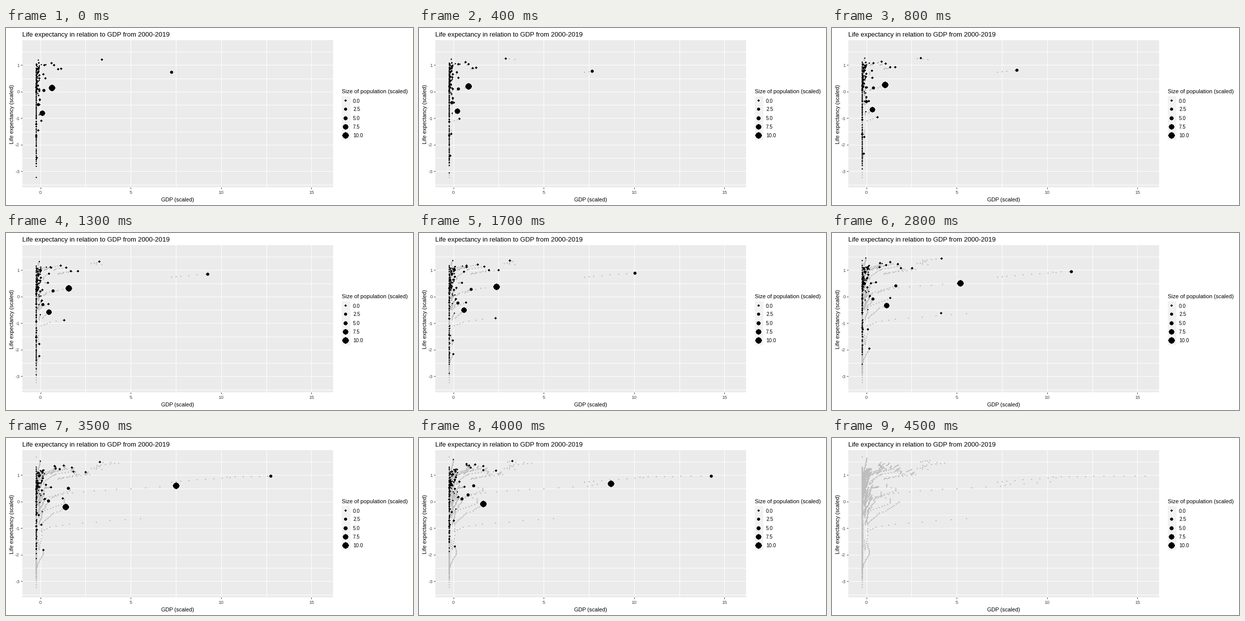
These frames come from a looping animation (800 by 350 pixels, 5000 ms). A matplotlib script:

```python
import numpy as np
import matplotlib.pyplot as plt
from matplotlib.animation import FuncAnimation
from matplotlib.collections import PathCollection
from matplotlib.patches import Rectangle
from matplotlib.path import Path
from matplotlib.transforms import IdentityTransform

W, H, DPI = 800, 350, 100
PX = 72 / DPI                      # one pixel in points
LEFT, RIGHT, TOP, BOTTOM = 32, 643, 24, 315
X0, XU, Y0, YU = 67.55, 35.52, 125.88, 52.5   # pixel origin and unit length
YEARS = np.arange(20)
FRAMES, MOVING = 100, 90

plt.rcParams.update({"font.family": "Liberation Sans", "axes.unicode_minus": False})


# ---- data: GDP in trillions, life expectancy in years, population in millions

def path(**points):
    """Straight pieces through a few key years, given as y<year>=value."""
    return np.interp(YEARS, [int(k[1:]) for k in points], list(points.values()))


WORLD = path(y0=0, y2=.03, y8=.62, y9=.52, y14=.86, y15=.72, y19=1)
EURO = path(y0=1.36, y2=1.5, y8=2.92, y10=2.65, y14=2.86, y15=2.44, y19=2.73)


def growing(start, end):
    return start + (end - start) * WORLD


def boom(start, peak, end):
    return path(y0=start, y3=.9 * start + .1 * peak, y11=peak, y14=peak, y16=end, y19=end)


def euro(first, last):
    return EURO * np.linspace(first, last, 20)


def ramp(*values):
    return np.interp(YEARS, np.linspace(0, 19, len(values)), values)


COUNTRIES = [
    (path(y0=10.25, y2=10.94, y8=14.71, y9=14.45, y14=17.53, y19=21.43), ramp(76.6, 78.5, 78.8), 282),
    (path(y0=1.21, y3=1.66, y6=2.75, y10=6.09, y14=10.48, y16=11.23, y19=14.28), ramp(71.1, 76.7), 1262),
    (path(y0=4.97, y2=4.18, y5=4.83, y7=4.58, y12=6.27, y15=4.44, y19=5.12), ramp(81, 83, 84.3), 127),
    (path(y0=.47, y9=1.34, y11=1.82, y19=2.83), ramp(62.1, 69.6), 1057),
    (path(y0=.4, y3=1.05, y6=2.5, y9=5.6, y11=7.92, y12=.2), ramp(59.4, 66.8), 47),
    (euro(1, 1), ramp(79.1, 82.6), 61),
    (euro(1.4, 1.38), ramp(77.9, 81), 82),
    (euro(1.22, .98), ramp(77.7, 81.3), 59),
    (euro(.85, .75), ramp(79.8, 83.3), 57),
    (euro(.47, .52), ramp(79, 83.5), 41),
    (boom(.26, 2.15, 1.45), ramp(65.2, 68.5, 73), 146),
    (boom(.6, 2.55, 1.85), ramp(70.1, 75.9), 175),
    (boom(.74, 1.82, 1.62), ramp(79.2, 82), 31),
    (boom(.4, 1.5, 1.36), ramp(79.2, 82.9), 19),
    (boom(.15, .42, .36), ramp(56, 52.6, 56, 61.6, 64), 46),
    (boom(.07, .56, .45), ramp(46.3, 54.7), 122),
    (growing(.7, 1.25), ramp(74.5, 75), 99),
    (growing(.57, 1.68), ramp(75.9, 83.2), 47),
    (growing(.17, 1.12), ramp(65.2, 71.4), 212),
    (growing(.26, .85), ramp(69.9, 77.6), 64),
    (growing(.17, .36), ramp(80.9, 85.1), 7),
    (growing(.002, .004), ramp(39.4, 48, 54.7), 4.5),
    (growing(.001, .002), ramp(47.8, 41.8, 43.5, 49.5, 54), 2),
    (growing(.001, .002), path(y0=79.5, y11=81.5, y12=85.6, y13=82), 1),
]


def middle_countries(count=22):
    rng = np.random.default_rng(5)
    for k in range(count):
        start = 62 + 18 * (k / count) ** .6 + rng.normal(0, .5)
        gdp = rng.uniform(.06, .27)
        yield (growing(gdp, gdp * rng.uniform(1.7, 3)),
               ramp(start, start + 2.8 + .2 * (78 - start)), 90 * rng.random() ** 2 + 4)


def small_countries(count=132):
    """The many small economies: poorer ones start lower and gain more."""
    rng = np.random.default_rng(11)
    for k in range(count):
        rank = (k + rng.random()) / count
        start = np.interp(rank, (0, .08, .27, .5, .75, 1), (43.2, 48.2, 60, 69.8, 74, 80))
        gain = max(2.6 + .33 * (76 - start) + rng.normal(0, .8), .8)
        life = start + gain * (YEARS / 19) ** (1.5 if start < 58 else 1)
        gdp = min(np.exp(np.log(.004) + 2.5 * rank ** 1.5 + rng.normal(0, 1.1)), .2)
        pop = min(np.exp(np.log(6) + rng.normal(0, 1.3)), 60)
        yield growing(gdp, gdp * rng.uniform(1.9, 3.8)), life, pop


COUNTRIES += [*middle_countries(), *small_countries()]
gdp, life, people = zip(*COUNTRIES)
xs = np.array(gdp).T * .7307 - .25
ys = (np.array(life).T - 69.8) / 9.4
pops = np.outer(1 + .007 * YEARS, people)


# ---- dots: discs made of whole pixels

def disc(radius):
    rows = []
    for dy in range(-radius, radius + 1):
        half = int(np.sqrt(radius * (radius + .2) - dy * dy)) + .5
        rows.append(Path([(-half, dy - .5), (half, dy - .5), (half, dy + .5),
                          (-half, dy + .5), (-half, dy - .5)], closed=True))
    return Path.make_compound_path(*rows)


DISCS = [disc(r) for r in range(1, 8)]


def discs_for(pop):
    """Disc area follows the population."""
    size = 1 + 5 * np.sqrt(np.clip(pop / 1408, 0, 1))
    radius = np.floor(1.067 * size + .13).astype(int)
    return [DISCS[r - 1] for r in radius]


def dot_layer(axes, color, zorder):
    layer = PathCollection([DISCS[0]], offsets=np.empty((0, 2)), facecolors=color, linewidths=0,
                           offset_transform=axes.transData, zorder=zorder)
    layer.set_transform(IdentityTransform())
    layer.set_snap(False)
    axes.add_collection(layer, autolim=False)
    return layer


def snapped(x, y):
    """Positions moved to pixel centres."""
    px, py = np.round(X0 + XU * x) + .5, np.round(Y0 - YU * y) - .5
    return np.column_stack([(px - X0) / XU, (Y0 - py) / YU])


# ---- chart

fig = plt.figure(figsize=(W / DPI, H / DPI), dpi=DPI, facecolor="white")
ax = fig.add_axes([LEFT / W, 1 - BOTTOM / H, (RIGHT - LEFT) / W, (BOTTOM - TOP) / H],
                  facecolor="#EBEBEB")
ax.set_xlim((LEFT - X0) / XU, (RIGHT - X0) / XU)
ax.set_ylim((Y0 - BOTTOM) / YU, (Y0 - TOP) / YU)
ax.set_xticks(range(0, 16, 5))
ax.set_xticks(np.arange(2.5, 15, 5), minor=True)
ax.set_yticks(range(-3, 2))
ax.set_yticks(np.arange(-3.5, 2), minor=True)
ax.set_axisbelow(True)
ax.grid(which="both", color="white", lw=PX, antialiased=False)
ax.tick_params(length=3 * PX, width=PX, color="#333333", labelcolor="#4D4D4D",
               labelsize=9.5 * PX, pad=2.5 * PX)
ax.tick_params(axis="x", pad=3.5 * PX)
ax.tick_params(which="minor", length=0)
for spine in ax.spines.values():
    spine.set_visible(False)


def label(x, y, text, size=10.8, **style):
    fig.text(x / W, 1 - y / H, text, fontsize=size * PX, **style)


label(32, 17, "Life expectancy in relation to GDP from 2000-2019", 12.95)
label(337, 343, "GDP (scaled)", ha="center")
label(12, 170, "Life expectancy (scaled)", rotation=90, ha="center", va="center")
label(660, 129, "Size of population (scaled)", 10.9)

legend = fig.add_axes([0, 0, 1, 1], facecolor="none")
legend.set(xlim=(0, W), ylim=(H, 0))
legend.axis("off")
legend.add_patch(Rectangle((660, 135), 17, 87, fc="#F2F2F2", lw=0))
levels = np.linspace(0, 10, 5)
rows = np.floor(143.5 + 17.28 * np.arange(5)) + .5
keys = dot_layer(legend, "black", 3)
keys.set_paths(discs_for(35 + 135 * levels))
keys.set_offsets(np.column_stack([np.full(5, 667.5), rows]))
for level, y in zip(levels, rows):
    label(682, y + 4, f"{level:.1f}", 10)

trail = dot_layer(ax, "#BEBEBE", 3)
dots = dot_layer(ax, "black", 4)


# ---- motion: each year rests for two frames, then moves on evenly

arrival = np.where(YEARS <= 13, 5 * YEARS - 1, 4 * YEARS + 12)
rest_frames = np.column_stack([arrival, arrival + 1]).ravel()
rest_years = np.repeat(YEARS, 2)


def between(table, year):
    low = min(int(year), 18)
    part = year - low
    return table[low] * (1 - part) + table[low + 1] * part


def update(i):
    past = np.sum(arrival + 2 <= i)
    trail.set_offsets(np.unique(snapped(xs[:past].ravel(), ys[:past].ravel()), axis=0))
    if i < MOVING:
        year = np.interp(i, rest_frames, rest_years)
        dots.set_paths(discs_for(between(pops, year)))
        dots.set_offsets(snapped(between(xs, year), between(ys, year)))
    else:
        dots.set_offsets(np.empty((0, 2)))
        dots.set_paths([])
    return trail, dots


anim = FuncAnimation(fig, update, frames=FRAMES, interval=50, repeat=True, repeat_delay=0)
plt.show()
```
